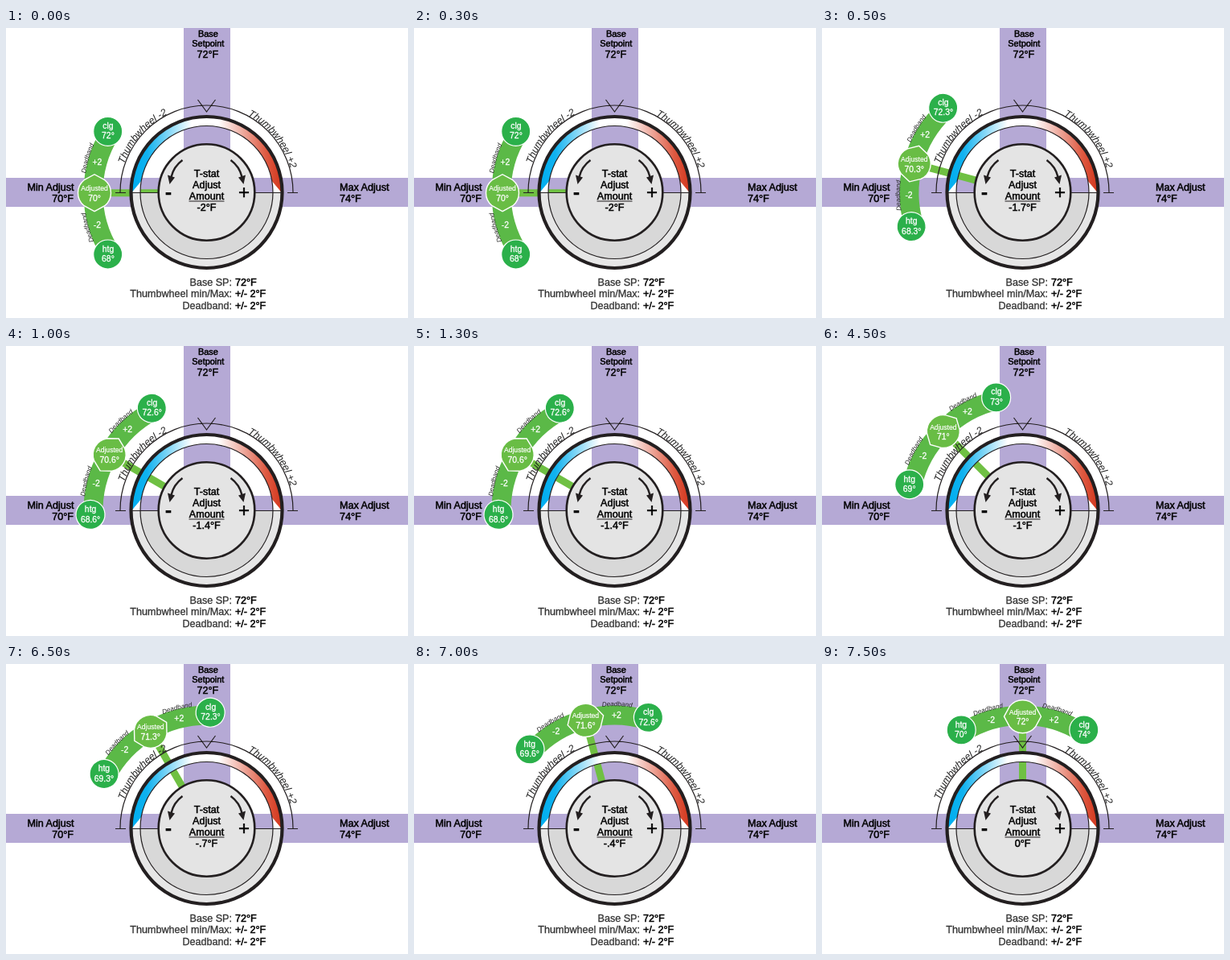
An HTML page for the animation above (8000 ms loop, 500 by 360 pixels).

```html
<!DOCTYPE html>
<html lang="en">
<head>
<meta charset="utf-8">
<title>Thermostat setpoint dial</title>
<style>
  html, body { margin: 0; width: 100%; height: 100%; overflow: hidden; background: #fff; }
  svg { display: block; width: 500px; height: 360px; }
  text { font: 12.6px "Liberation Sans", Arial, sans-serif; stroke: #000; stroke-width: .5; }
  .mid { text-anchor: middle; }
  .end { text-anchor: end; }
  .base { font-size: 10.9px; }
  .label { fill: #333; stroke: #333; stroke-width: .3; }
  .wheel { font: italic 12.2px "Liberation Sans", Arial, sans-serif; fill: #222; stroke: none; }
  .dead { font: italic 8.1px "Liberation Sans", Arial, sans-serif; fill: #222; stroke: none; }
  .sign { font-size: 24px; }
  .tag { text-anchor: middle; fill: #fff; stroke: #fff; stroke-width: .3; font-size: 10.4px; }
  .adj { font-size: 8.6px; stroke-width: .2; }
  .line { fill: none; stroke: #231f20; stroke-width: 1.2; }
</style>
</head>
<body>
<svg viewBox="0 0 500 360">
  <defs>
    <linearGradient id="heat" gradientUnits="userSpaceOnUse" x1="157" x2="342">
      <stop offset="0" stop-color="#00aeef"/>
      <stop offset=".1" stop-color="#10b2f0"/>
      <stop offset=".4" stop-color="#fff"/>
      <stop offset=".58" stop-color="#fff"/>
      <stop offset=".9" stop-color="#de5a42"/>
      <stop offset="1" stop-color="#d3381f"/>
    </linearGradient>
    <path id="wheelArc" d="M141 204A108.500 108.500 0 0 1 358 204"/>
    <path id="deadArc" d="M-152.500 0A152.500 152.500 0 0 1 152.500 0"/>
  </defs>

  <g fill="#b5a9d5">
    <path d="M221 0H279V186H221Z"/>
    <path d="M0 186H500V222H0Z"/>
  </g>

  <path id="needle" d="M0 -140V-58" stroke="#6fc043" stroke-width="9"/>

  <!-- dial -->
  <path d="M155.500 204A94 94 0 0 0 343.500 204Z" fill="#e6e6e6"/>
  <path d="M167 204A82.500 82.500 0 0 0 332 204Z" fill="#d8d8d8"/>
  <path d="M156.500 204A93 93 0 0 1 342.500 204H332A82.500 82.500 0 0 0 167 204Z" fill="#fff"/>
  <path d="M156.500 204A93 93 0 0 1 342.500 204L330.800 190A82.500 82.500 0 0 0 168.200 190Z" fill="url(#heat)"/>
  <path class="line" d="M155 204.500H190M309 204.500H344"/>
  <circle class="line" cx="249.500" cy="204" r="82.500"/>
  <circle cx="249.500" cy="204" r="94" fill="none" stroke="#231f20" stroke-width="4.2"/>
  <circle cx="249.500" cy="204" r="59.800" fill="#e4e4e4" stroke="#231f20" stroke-width="2.6"/>

  <!-- thumbwheel bracket -->
  <path class="line" d="M136 204.500H149M350 204.500H363M142 204A107.500 108 0 0 1 357 204M238.500 89L249.500 104L260.500 89"/>
  <text class="wheel mid"><textPath href="#wheelArc" startOffset="22.8%">Thumbwheel -2</textPath></text>
  <text class="wheel mid"><textPath href="#wheelArc" startOffset="78.4%">Thumbwheel +2</textPath></text>

  <!-- turn arrows -->
  <g id="arrow">
    <path d="M219.500 164Q208.500 172 205.500 185" fill="none" stroke="#231f20" stroke-width="2.4"/>
    <path d="M201 182.500L210 185.500L203.500 194Z" fill="#231f20"/>
  </g>
  <use href="#arrow" transform="matrix(-1 0 0 1 499 0)"/>

  <text class="sign mid" x="202" y="211.500" style="font-weight:bold">-</text>
  <text class="sign mid" x="296" y="212">+</text>
  <text class="mid" x="249.500" y="184.500">T-stat</text>
  <text class="mid" x="249.500" y="198.500">Adjust</text>
  <text class="mid" x="249.500" y="213">Amount</text>
  <path class="line" d="M227.500 215H271.500"/>
  <text class="mid" id="amount" x="249.500" y="227"></text>

  <text class="mid base" x="251.300" y="11">Base</text>
  <text class="mid base" x="251.300" y="23">Setpoint</text>
  <text class="mid" x="250.800" y="36.500">72°F</text>
  <text class="end" x="84.500" y="202">Min Adjust</text>
  <text class="end" x="84" y="216">70°F</text>
  <text x="415" y="202">Max Adjust</text>
  <text x="415" y="216">74°F</text>

  <text class="end label" x="281" y="320">Base SP:</text>
  <text class="end label" x="281" y="334">Thumbwheel min/Max:</text>
  <text class="end label" x="281" y="348.500">Deadband:</text>
  <text x="285" y="320">72°F</text>
  <text x="285" y="334">+/- 2°F</text>
  <text x="285" y="348.500">+/- 2°F</text>

  <!-- rotating setpoint band -->
  <g id="band">
    <path d="M-74.700 -119.600A141 141 0 0 1 74.700 -119.600" fill="none" stroke="#5bb947" stroke-width="24"/>
    <text class="dead mid"><textPath href="#deadArc" startOffset="41%">Deadband</textPath></text>
    <text class="dead mid"><textPath href="#deadArc" startOffset="59%">Deadband</textPath></text>
    <path d="M-23 -139.500L-16 -152.300A20.500 20.500 0 0 1 16 -152.300L23 -139.500L16 -126.700A20.500 20.500 0 0 1 -16 -126.700Z" fill="#69bd45" stroke="#fff" stroke-width="1.4"/>
    <g fill="#2bb04a" stroke="#fff" stroke-width="1.2">
      <circle cx="-76.300" cy="-122.800" r="18"/>
      <circle cx="76.300" cy="-122.800" r="18"/>
    </g>
  </g>
  <g id="tags"></g>
</svg>
<script>
  const CX = 249.5, CY = 204.7;
  const adjusted = [70, 70.3, 70.6, 71, 71.3, 71.6, 72];
  const cooling = [72, 72.3, 72.6, 73, 72.3, 72.6, 74];
  const amounts = ['-2', '-1.7', '-1.4', '-1', '-.7', '-.4', '0'];
  const get = id => document.getElementById(id);
  let shown = -1;

  // Upright lines of text at a polar position; angles run clockwise from the top.
  function tag(angle, radius, lines) {
    const a = angle * Math.PI / 180;
    const x = CX + radius * Math.sin(a), y = CY - radius * Math.cos(a);
    return lines.map(([text, dy, style = '']) =>
      `<text class="tag ${style}" x="${x}" y="${y + dy}">${text}</text>`).join('');
  }

  function draw(step) {
    const angle = step * 15 - 90;
    const place = `translate(${CX} ${CY}) rotate(${angle})`;
    get('band').setAttribute('transform', place);
    get('needle').setAttribute('transform', place);
    get('amount').textContent = amounts[step] + '°F';
    const heating = +(adjusted[step] - 2).toFixed(1);
    get('tags').innerHTML =
      tag(angle - 32, 144.5, [['htg', -3.5], [heating + '°', 9]]) +
      tag(angle + 32, 144.5, [['clg', -3.5], [cooling[step] + '°', 9]]) +
      tag(angle, 139.5, [['Adjusted', -2.5, 'adj'], [adjusted[step] + '°', 10]]) +
      tag(angle - 16, 141.5, [['-2', 4]]) +
      tag(angle + 16, 141.5, [['+2', 4]]);
  }

  // The dial holds at step 3 for five seconds.
  function tick() {
    const t = performance.now() % 8000;
    const step = Math.floor((t < 2000 ? t : Math.max(1500, t - 4500)) / 500);
    if (step !== shown) draw(shown = step);
    requestAnimationFrame(tick);
  }
  tick();
</script>
</body>
</html>
```
